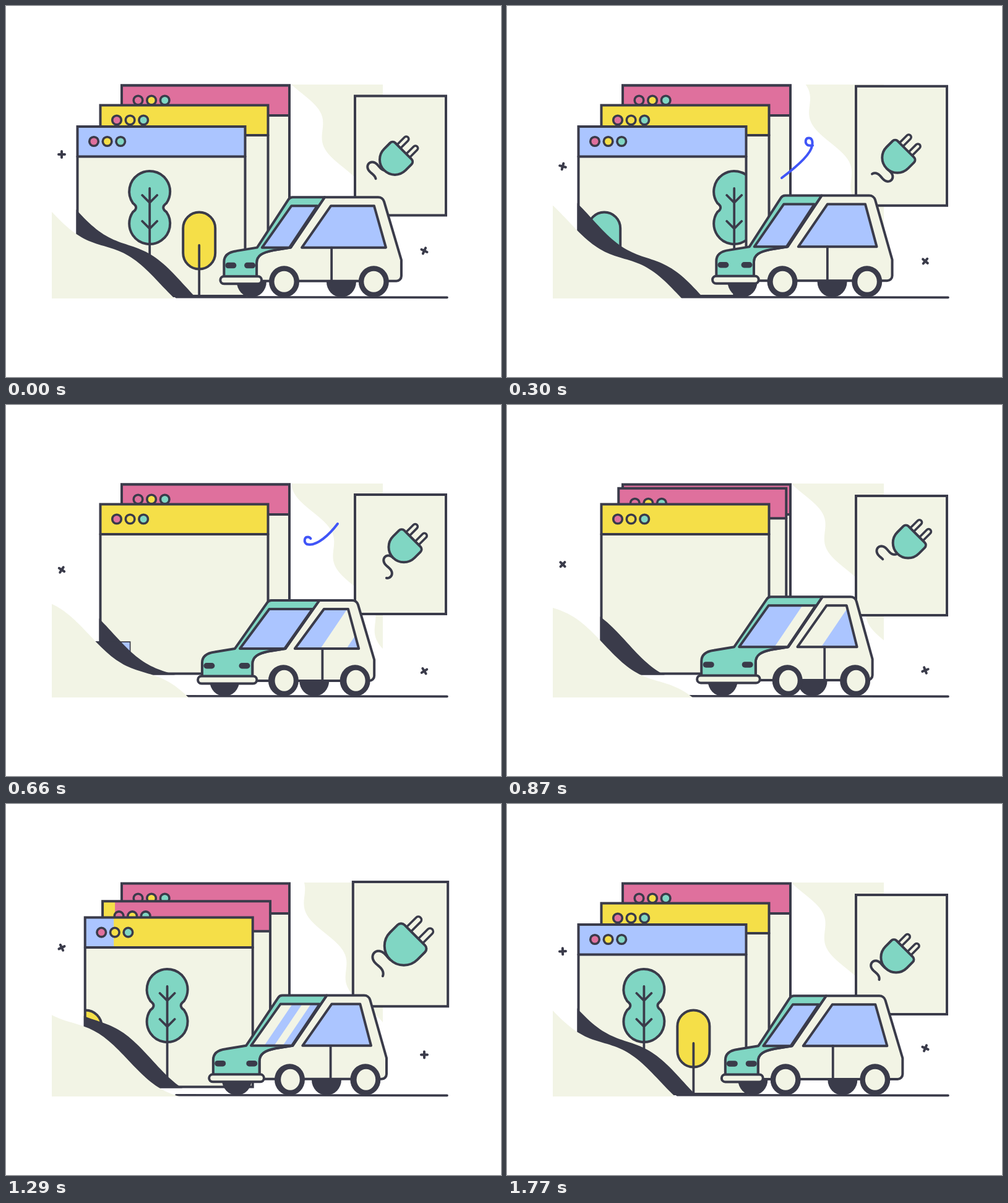
An HTML page with a canvas for the animation above (1.8 s loop, 800 px wide and 600 px high).

```html
<!DOCTYPE html>
<html lang="en">
<head>
<meta charset="utf-8">
<title>Electric car</title>
<style>
  html, body { margin: 0; width: 100%; height: 100%; overflow: hidden; background: #fff; }
  canvas { display: block; width: 800px; height: 600px; }
</style>
</head>
<body>
<canvas id="stage" width="800" height="600"></canvas>
<script>
const c = document.getElementById('stage').getContext('2d');
const DARK = '#3a3b4a', CREAM = '#f2f4e5', PINK = '#df709d', YELLOW = '#f5df48',
      BLUE = '#abc5ff', GREEN = '#80d6c3', INK = '#4055f7';
const LOOP = 1800, STEP = 30, GROUND = 472.5;
const W = 271, H = 274, HEAD = 48.5;

const clamp = x => Math.min(1, Math.max(0, x));
const mix = (a, b, p) => a + (b - a) * p;
const ramp = (t, a, b) => clamp((t - a) / (b - a));
const smooth = p => p * p * (3 - 2 * p);
const easeOut = p => Math.sin(p * Math.PI / 2);
const wave = (x, crest, period = LOOP) => Math.cos(2 * Math.PI * (x - crest) / period);
const pulse = (t, a, top, b) => smooth(t < top ? ramp(t, a, top) : 1 - ramp(t, top, b));

function paint(fill, width = 4, color = DARK) {
  if (fill) { c.fillStyle = fill; c.fill(); }
  if (width) { c.lineWidth = width; c.strokeStyle = color; c.stroke(); }
}
function box(x, y, w, h, r, fill, width) {
  c.beginPath();
  if (r) c.roundRect(x, y, w, h, r); else c.rect(x, y, w, h);
  paint(fill, width);
}
function oval(x, y, rx, ry, fill, width) {
  c.beginPath();
  c.ellipse(x, y, rx, ry, 0, 0, 7);
  paint(fill, width);
}
function lines(width, ...paths) {
  c.beginPath();
  for (const p of paths) p.forEach(([x, y], i) => i ? c.lineTo(x, y) : c.moveTo(x, y));
  paint(null, width);
}
function poly(pts, fill, width) {
  c.beginPath();
  pts.forEach(p => c.lineTo(...p));
  c.closePath();
  paint(fill, width);
}
function clipped(x, y, w, h, fn) {
  c.save();
  c.beginPath();
  c.rect(x, y, w, h);
  c.clip();
  fn();
  c.restore();
}

// Pale shape whose left edge ripples upwards
function cloud(t) {
  const edge = y => 470 + .56 * (y - 127) - 13 * wave(y + t * 120 / 900, 231, 120);
  clipped(400, 127, 209, 290, () => {
    c.beginPath();
    for (let y = 120; y <= 420; y += 4) c.lineTo(edge(y), y);
    c.lineTo(700, 420);
    c.lineTo(700, 120);
    paint(CREAM, 0);
  });
}

// Slopes with a ripple running downhill, one wavelength per loop
function slope(t, y0, grade, crest, fill) {
  c.beginPath();
  c.moveTo(74, 600);
  for (let x = 74; x <= 340; x += 4)
    c.lineTo(x, y0 + grade * (x - 74) - 11 * wave(x - t / 10, crest, 180));
  c.lineTo(340, 600);
  paint(fill, 0);
}
const hill = t => clipped(74, 300, 300, 173, () => slope(t, 331, .675, 24, CREAM));
const road = t => slope(t, 299, .71, 62, DARK);

function tree(x) {
  const r = 33, a = Math.acos(19 / r) - .35, dx = r * Math.cos(a), dy = r * Math.sin(a);
  c.beginPath();
  c.arc(x, 300, r, Math.PI - a, a + 2 * Math.PI);
  c.quadraticCurveTo(x + 17, 326, x + dx, 352 - dy);
  c.arc(x, 352, r, -a, Math.PI + a);
  c.quadraticCurveTo(x - 17, 326, x - dx, 300 + dy);
  c.closePath();
  paint(GREEN);
  const fork = y => [[x - 12, y - 12], [x, y], [x + 12, y - 12]];
  lines(3.8, [[x, 295], [x, 480]], fork(318), fork(360));
}
function bush(x, fill) {
  box(x - 26, 333.5, 52, 92, 26, fill);
  lines(3.8, [[x, 387], [x, 480]]);
}
function trees(t) {
  const run = t < 750 ? t + LOOP : t;
  const s = .36 * (run - 1530) - 3 + .09 * Math.max(0, run - LOOP);
  tree(350 + s);
  bush(218 + s, YELLOW);
  tree(138 + s);
  bush(s - 72, GREEN);
}

// A browser window; the second colour wipes in from the left
function page(x, y, color, next, p, inside) {
  box(x, y, W, H, 0, CREAM, 0);
  if (inside) clipped(x, y + HEAD, W, H - HEAD, inside);
  box(x, y, W, HEAD, 0, color, 0);
  if (p > 0) box(x, y, W * p, HEAD, 0, next, 0);
  box(x, y, W, H, 0);
  lines(4, [[x, y + HEAD], [x + W, y + HEAD]]);
  [PINK, YELLOW, GREEN].forEach((f, i) => oval(x + 26.5 + 21.6 * i, y + 24, 7.3, 7.3, f, 3.6));
}
const roadIn = (x, y, s, t) =>
  clipped(x - 2 * s, y - 2 * s, (W + 4) * s, (H + 4) * s, () => road(t));

function pages(t) {
  c.lineJoin = 'miter';
  page(187, 128.5, PINK);
  const back = easeOut(ramp(t, 780, 1500));
  page(mix(187, 152.5, back), mix(128.5, 160.5, back), PINK, YELLOW, smooth(ramp(t, 1200, 1740)));
  const front = easeOut(ramp(t, 1080, 1530));
  const x = mix(152.5, 115.5, front), y = mix(160.5, 195, front);
  page(x, y, YELLOW, BLUE, ramp(t, 1206, 1696), t > 750 && (() => trees(t)));
  roadIn(x, y, 1, t);
  if (t < 720) {
    const p = ramp(t, 360, 720) ** 2;
    const s = 1 - .84 * p, bx = 115.5 - 40 * p, by = 195 + 271 * p;
    c.save();
    c.translate(bx, by);
    c.scale(s, s);
    c.translate(-115.5, -195);
    page(115.5, 195, BLUE, BLUE, 0, () => trees(t));
    c.restore();
    roadIn(bx, by, s, t);
  }
  c.lineJoin = 'round';
}

function swirl(t) {
  const head = easeOut(ramp(t, 155, 495)), tail = smooth(ramp(t, 400, 950));
  if (head <= 0 || tail >= 1) return;
  const len = 180, a = tail * len, b = head * len;
  c.save();
  c.setLineDash([Math.max(.1, b - a), 999]);
  c.lineDashOffset = -a;
  c.beginPath();
  c.moveTo(444, 278);
  c.bezierCurveTo(468, 260, 491, 240, 493, 226);
  c.bezierCurveTo(495, 216, 491, 213, 487, 213.5);
  c.bezierCurveTo(482, 214, 481, 222, 486, 225);
  c.bezierCurveTo(502, 230, 524, 208, 536, 192);
  paint(null, 4, INK);
  c.restore();
}

function plus(x, y, deg) {
  c.save();
  c.translate(x, y);
  c.rotate(deg * Math.PI / 180);
  lines(4, [[-5, 0], [5, 0]], [[0, -5], [0, 5]]);
  c.restore();
}

function panel(t) {
  const s = 1 + .2 * pulse(t, 870, 1080, 1380);
  const w = 147 * s, h = 193 * s;
  c.lineJoin = 'miter';
  box(637.5 - w / 2, 235.5 + 9.5 * wave(t, 785, 900) - h / 2, w, h, 0, CREAM);
  c.lineJoin = 'round';
}

// The cord is a meander: its heading swings as a sine of its length
function cord(t, width) {
  const phase = (32 + .06 * t - 13 * Math.sin(Math.PI * t / LOOP) ** 2) / 36;
  let u = -28, v = 0;
  c.beginPath();
  c.moveTo(u, v);
  for (let d = 0; d < 60; d++) {
    const heading = 1.65 * Math.sin(2 * Math.PI * (phase - d / 76));
    u -= Math.cos(heading);
    v += Math.sin(heading);
    c.lineTo(u, v);
  }
  paint(null, width);
}

function plug(t) {
  const k = wave(t, 985), s = 1 + .35 * pulse(t, 990, 1200, 1500), lw = 4 / s;
  c.save();
  c.translate(641 + 10.5 * k, 233 - 13.5 * k);
  c.scale(s, s);
  c.rotate(-Math.PI / 4);
  cord(t, lw);
  for (const v of [-10.5, 10.5]) box(8, v - 4, 29, 8, 4, CREAM, 3.6 / s);
  c.beginPath();
  c.moveTo(16, 0);
  c.arcTo(16, -24.5, -3.5, -24.5, 6);
  c.arc(-3.5, 0, 24.5, -Math.PI / 2, Math.PI / 2, true);
  c.arcTo(16, 24.5, 16, 0, 6);
  c.closePath();
  paint(GREEN, lw);
  c.restore();
}

// Glass with pale slanted reflections given as [left, right] along its base
function glass(pts, base, shines) {
  poly(pts, BLUE, 0);
  c.save();
  c.clip();
  for (const [l, r] of shines)
    poly([[l, base], [r, base], [r + 54, base - 80], [l + 54, base - 80]], CREAM, 0);
  c.restore();
  poly(pts, null, 4);
}

function car(t) {
  const x0 = 373 + 24.5 * wave(t, 1740), turn = .53 + .54 * wave(t, 915), bob = wave(t, 640, 900);
  // Offset from the far front wheel, plus how far it shifts as the car turns
  const X = (a, b = 0) => x0 + a + b * turn;
  const roof = 310.5 + 5.5 * bob, top = roof + 14, base = 391.3 + 2.7 * bob;
  const bump = 443.5 + bob, sill = 445 + bob, lamp = 420 + 1.8 * bob;
  const pillar = X(118.5, 40), foot = X(63.5, 40), faceL = X(-44.5, 9.5), faceR = X(8.5, 42);
  const right = X(242), sideTop = 411 + bob;

  oval(X(0), 446, 24, 25, DARK, 0);
  oval(X(145), 446, 24, 25, DARK, 0);

  c.beginPath();
  c.moveTo(pillar, roof);
  c.arcTo(X(212, 2), roof, right, sideTop, 10);
  c.lineTo(right, sideTop);
  c.arcTo(right, sill, right - 20, sill, 8);
  c.lineTo(faceR, sill);
  c.lineTo(faceR, base + 25);
  c.bezierCurveTo(faceR, base + 13, faceR + 9, base + 8, foot - 28, base + 4.5);
  c.lineTo(foot, base);
  c.closePath();
  paint(CREAM);

  c.beginPath();
  c.moveTo(pillar, roof);
  c.lineTo(foot, base);
  c.lineTo(foot - 28, base + 4.5);
  c.bezierCurveTo(faceR + 9, base + 8, faceR, base + 13, faceR, base + 25);
  c.lineTo(faceR, bump);
  c.lineTo(faceL, bump);
  c.lineTo(faceL, base + 23);
  c.bezierCurveTo(faceL, base + 12, faceL + 9, base + 7, faceL + 20, base + 5.5);
  c.lineTo(X(9, 9), base);
  c.arcTo(X(62, 11), roof, pillar, roof, 8);
  c.closePath();
  paint(GREEN);

  const w = x0 + 84 - .165 * (t - 1050), s = x0 + 197 - .18 * (t - 660);
  glass([[X(64.5, 9), top], [X(106.5, 41), top], [X(61.5, 41), base], [X(17, 9), base]], base,
    [[w - 30, w], [w + 16, w + 30]]);
  glass([[X(128.5, 37), top], [X(198, 2), top], [X(217), base], [X(81.5, 37), base]], base,
    [[s - 42, s]]);
  const door = X(129.5, 33);
  lines(3.8, [[door, base], [door, sill]]);

  for (const x of [X(53, 50), X(197.5, 17)]) {
    oval(x - 1.5 * turn, 445.7, 24.5, 25.5, DARK, 0);
    oval(x, 445.7, 16 - turn, 17, CREAM, 0);
  }
  const bl = X(-50.5, 8.5);
  box(bl, bump - 6, X(16.5, 41) - bl, 12, 6, CREAM);
  for (const x of [X(-33.5, 10), X(-2.5, 40)]) box(x - 9, lamp - 4.7, 18, 9.4, 4.7, DARK, 0);
}

function draw(t) {
  c.fillStyle = '#fff';
  c.fillRect(0, 0, 800, 600);
  c.lineCap = c.lineJoin = 'round';
  cloud(t);
  clipped(0, 0, 800, GROUND, () => pages(t));
  lines(3.6, [[275, 470.7], [500, 471], [713, 471.4]]);
  hill(t);
  swirl(t);
  panel(t);
  plug(t);
  plus(90, 248 + 19.5 * wave(t, 570), t / 20);
  plus(676, 412 + 19 * wave(t, 740), 25 + t / 20);
  car(t);
}

const start = performance.now();
function tick() {
  const t = (performance.now() - start) % LOOP;
  draw(Math.floor(t / STEP) * STEP);
  requestAnimationFrame(tick);
}
tick();
</script>
</body>
</html>
```
